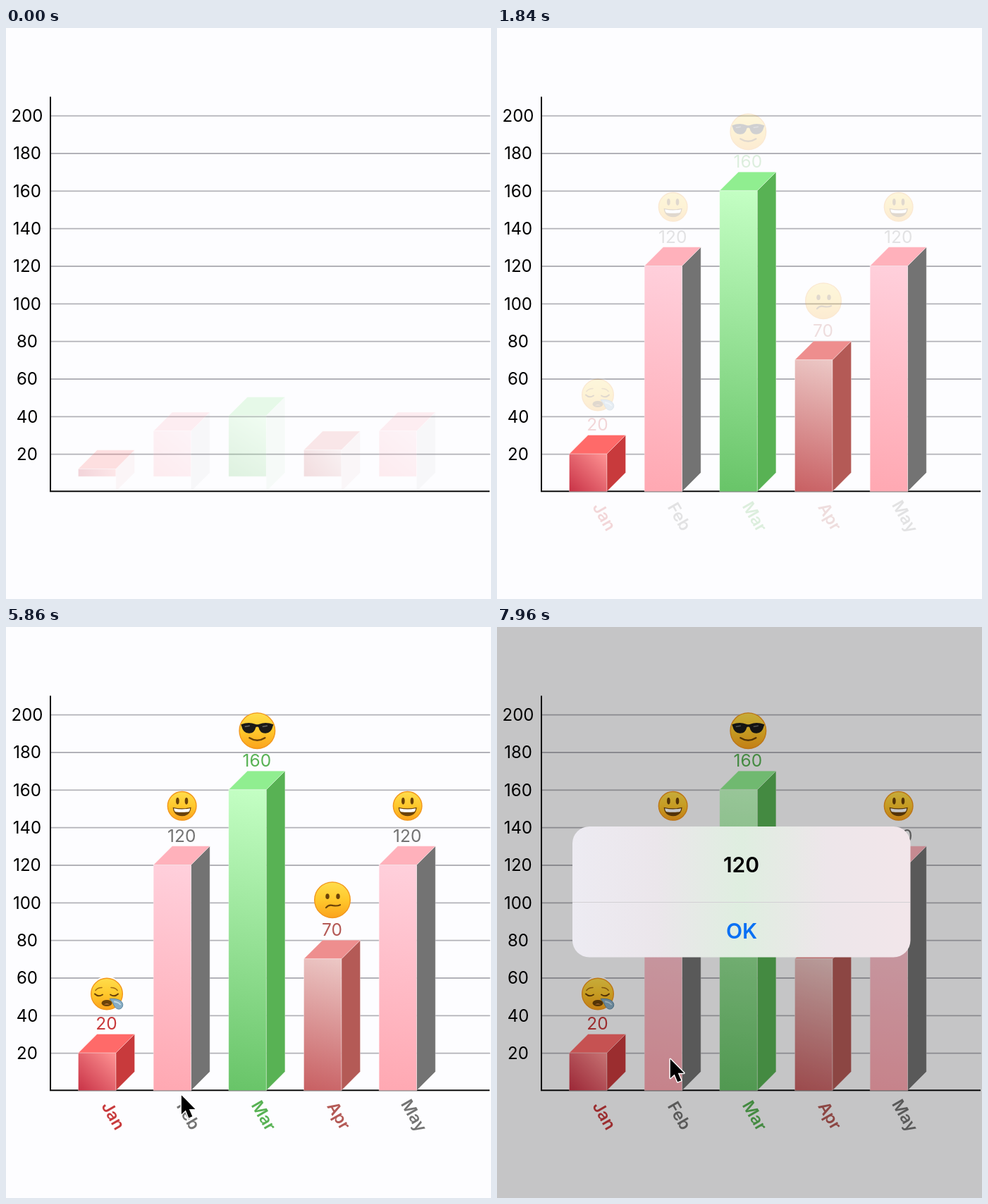
Write an HTML page that moves like this. It is 688x810 px and loops after 8 s.

```html
<!DOCTYPE html>
<html lang="en">
<head>
<meta charset="utf-8">
<title>Monthly bars</title>
<style>
html, body { margin: 0; width: 100%; height: 100%; overflow: hidden; background: #fdfdff; }
svg { display: block; width: 100vw; height: 100vh; }
text { font-family: Inter, "Open Sans", sans-serif; text-anchor: middle; }
</style>
</head>
<body>
<svg id="stage" viewBox="0 0 688 810"></svg>
<script>
const LOOP = 8000, BASE = 657.5, UNIT = 8 / 3, DEPTH = 80 / 3, WIDTH = 160 / 3;
const stage = document.getElementById('stage');

const styles = {
  low: { from: '#ff9494', to: '#c83246', top: '#ff6a69', side: '#c83a3c' },
  good: { from: '#ffd0dc', to: '#ffa8b2', top: '#ffb1bb', side: '#737373' },
  best: { from: '#c4ffc4', to: '#68c468', top: '#90ee90', side: '#58b254' },
  meh: { from: '#ecc8c6', to: '#c85f62', top: '#ee8e8e', side: '#b45a56' }
};
const bars = [
  { month: 'Jan', value: 20, style: 'low', face: 'sleepy' },
  { month: 'Feb', value: 120, style: 'good', face: 'happy' },
  { month: 'Mar', value: 160, style: 'best', face: 'cool' },
  { month: 'Apr', value: 70, style: 'meh', face: 'unsure' },
  { month: 'May', value: 120, style: 'good', face: 'happy' }
];

const label = (s, x, y, size, fill, weight = 400, extra = '') =>
  `<text x="${x}" y="${y + size * 0.364}" font-size="${size}" fill="${fill}" font-weight="${weight}" ${extra}>${s}</text>`;
const gradient = (id, colors, attrs) => `<linearGradient id="${id}" ${attrs}>` + colors.map((c, i) =>
  `<stop offset="${i / (colors.length - 1)}" stop-color="${c}"/>`).join('') + '</linearGradient>';
const line = (d, width, color = '#6b4208') =>
  `<path d="${d}" fill="none" stroke="${color}" stroke-width="${width}" stroke-linecap="round"/>`;
const eye = (x, y, rx, ry) => `<ellipse cx="${x}" cy="${y}" rx="${rx}" ry="${ry}" fill="#6b4208"/>`;
const disc = r => `<circle r="${r - 0.7}" fill="url(#skin)" stroke="#f2961c" stroke-width="1.4"/>`;

const faces = {
  happy: disc(21) + eye(-6.3, -7, 2.3, 4.8) + eye(6.3, -7, 2.3, 4.8) +
    '<path d="M-13 2Q0 5 13 2Q12 14 0 14.5Q-12 14-13 2Z" fill="#6b4208"/>' +
    '<path d="M-11.5 3.3Q0 6 11.5 3.3Q11 8 9 8.3Q0 9.5-9 8.3Q-11 8-11.5 3.3Z" fill="#fff"/>',
  cool: disc(26) +
    '<path d="M-23-9Q-12-13-3-9.5Q0-8.5 3-9.5Q12-13 23-9L22-6Q20 3 12 3.5Q4 4 2-5Q0-6.5-2-5Q-4 4-12 3.5Q-20 3-22-6Z" fill="#1b1a18"/>' +
    line('M-17-6L-11-7M8-6L14-7', 1.5, '#686866') + line('M-11 10Q0 17 11 10', 2.4),
  unsure: disc(26) + eye(-7, -5, 2.7, 3.8) + eye(8, -5, 2.7, 3.8) +
    line('M-9 11Q-5 6 1 8Q7 9 11 7', 2.2),
  sleepy: '<circle r="25" fill="#fff"/><circle cx="14" cy="14" r="12.5" fill="#fff"/>' + disc(23) +
    line('M-17 0Q-12 5-6 1M5 1Q11 5 16 0', 2) +
    line('M-16-5Q-13-9-7-9M6-9Q12-9 15-5', 1.6, '#a56d12') +
    '<ellipse cy="13" rx="7.5" ry="4.5" fill="#6b4208"/><path d="M-4 15Q0 12 4 15Z" fill="#c9803a"/>' +
    '<path d="M4 7Q14 6 20 10Q25 15 21 20Q16 24 11 18Q9 12 4 7Z" fill="#88adc4" stroke="#5e87a2"/>' +
    line('M11 11Q17 12 19 15', 2, '#c3dcea')
};

const barMarkup = (b, i) => {
  const s = styles[b.style], x = 102.5 + i * 2 * WIDTH, cx = x + 40;
  const top = BASE - b.value * UNIT - DEPTH;
  b.x = x;
  return `${gradient('shade' + i, [s.from, s.to], `gradientUnits="userSpaceOnUse" x1="${x + WIDTH}" x2="${x}"`)}
  <g id="item${i}">
    <g id="bar${i}" stroke="#fff" stroke-opacity=".4" stroke-width=".8">
      <path class="side" fill="${s.side}"/><path class="top" fill="${s.top}"/>
      <rect class="front" x="${x}" width="${WIDTH}" fill="url(#shade${i})"/>
    </g>
    <g class="tag">${label(b.value, cx, top - 15, 24.5, s.side)}
      <g transform="translate(${cx + 0.5} ${top - 57})">${faces[b.face]}</g></g>
  </g>
  <g class="tag">${label(b.month, 0, 0, 23.5, s.side, 600, `transform="translate(${x + 50} 693) rotate(60)"`)}</g>`;
};

let scale = '';
for (let v = 20; v <= 200; v += 20) {
  const y = BASE - v * UNIT + 0.5;
  scale += line(`M63 ${y}H686`, 1.8, '#b2b2b8') + label(v, 30, y - 0.3, 24, '#000');
}

stage.innerHTML = `
  ${gradient('skin', ['#ffdd4c', '#ffc82c', '#fba31c'], 'x1="0" y1="0" x2="0" y2="1"')}
  ${gradient('sheet', ['#edebf2', '#ebe6eb', '#dfeee0', '#ede6ea', '#f2e6ea'], 'x1="0" x2="1"')}
  <rect width="688" height="810" fill="#fdfdff"/>
  ${scale}
  <path d="M63 97.5V657.2H686" fill="none" stroke="#0c0c0c" stroke-width="2"/>
  ${bars.map(barMarkup).join('')}
  <rect id="dim" width="688" height="810"/>
  <g id="alert">
    <rect x="107" y="283" width="479.5" height="185.5" rx="24" fill="url(#sheet)"/>
    <path d="M107 390.5H586" stroke="#d2d0d4" stroke-width="1"/>
    ${label('120', 346.5, 337.5, 30, '#000', 600)}
    ${label('OK', 347, 431, 30, '#0a70f4', 600)}
  </g>
  <path id="cursor" d="M0 0V28.5L6.3 22.5L11 34L16.3 31.8L11.5 20.8H20.5Z" fill="#000" stroke="#fff"
    stroke-width="3" stroke-linejoin="round" paint-order="stroke"/>`;

const $ = q => stage.querySelector(q), $$ = q => stage.querySelectorAll(q);
const set = (node, attrs) => Object.entries(attrs).forEach(([k, v]) => node.setAttribute(k, v));
const clamp = v => Math.min(1, Math.max(0, v));
const mix = (a, b, k) => a + (b - a) * k;

// Cubic timing curve with handles (x1, 0) and (x2, 1).
const ease = (x1, x2) => u => {
  u = clamp(u);
  let lo = 0, hi = 1;
  for (let i = 0; i < 24; i++) {
    const s = (lo + hi) / 2, r = 1 - s;
    if (3 * r * r * s * x1 + 3 * r * s * s * x2 + s * s * s < u) lo = s; else hi = s;
  }
  return hi * hi * (3 - 2 * hi);
};
const easeIn = ease(0.42, 1), easeInOut = ease(0.42, 0.58), easeOut = ease(0, 0.58);

// Pointer stops: time, x, y.
const stops = [[4250, 270, 815], [4740, 251.5, 732], [4980, 251, 704], [5820, 249, 667],
  [6560, 247, 615.5], [7400, 247, 615.5], [7600, 245.8, 613]];
const pointer = t => {
  const i = stops.findIndex(s => s[0] > t);
  const b = stops.at(i), a = i > 0 ? stops[i - 1] : b;
  const k = a === b ? 0 : (t - a[0]) / (b[0] - a[0]);
  return [mix(a[1], b[1], k), mix(a[2], b[2], k)];
};

function drawBar(b, i, p) {
  const x = b.x, m = x + WIDTH, e = m + DEPTH;
  const foot = BASE - DEPTH * (1 - p), h = b.value * UNIT * p, y = foot - h;
  const g = $('#bar' + i);
  set(g, { opacity: p });
  set($('#shade' + i), { y1: y, y2: foot });
  set(g.querySelector('.front'), { y, height: h });
  set(g.querySelector('.side'), { opacity: p, d: `M${m} ${y}L${e} ${y - DEPTH}V${BASE - DEPTH}L${m} ${BASE}Z` });
  set(g.querySelector('.top'), { d: `M${x} ${y}L${x + DEPTH} ${y - DEPTH}H${e}L${m} ${y}Z` });
}

function draw(t) {
  const grow = easeIn((t + 925) / 2400);
  bars.forEach((b, i) => drawBar(b, i, grow));
  const tag = easeInOut((t - 1475) / 1200);
  $$('.tag').forEach(g => set(g, { opacity: tag }));

  const pressed = t >= 6580 ? mix(0.2, 1, easeOut((t - 7300) / 300)) : 1;
  set($('#item1'), { opacity: pressed });

  const show = easeOut((t - 7380) / 400);
  set($('#dim'), { opacity: 0.225 * show });
  set($('#alert'), {
    opacity: show,
    transform: `translate(346.5 376) scale(${mix(1.15, 1, show)}) translate(-346.5 -376)`
  });
  set($('#cursor'), { transform: `translate(${pointer(t)}) scale(.95)` });
}

const start = performance.now();
function tick() {
  draw((performance.now() - start) % LOOP);
  requestAnimationFrame(tick);
}
tick();
</script>
</body>
</html>
```
